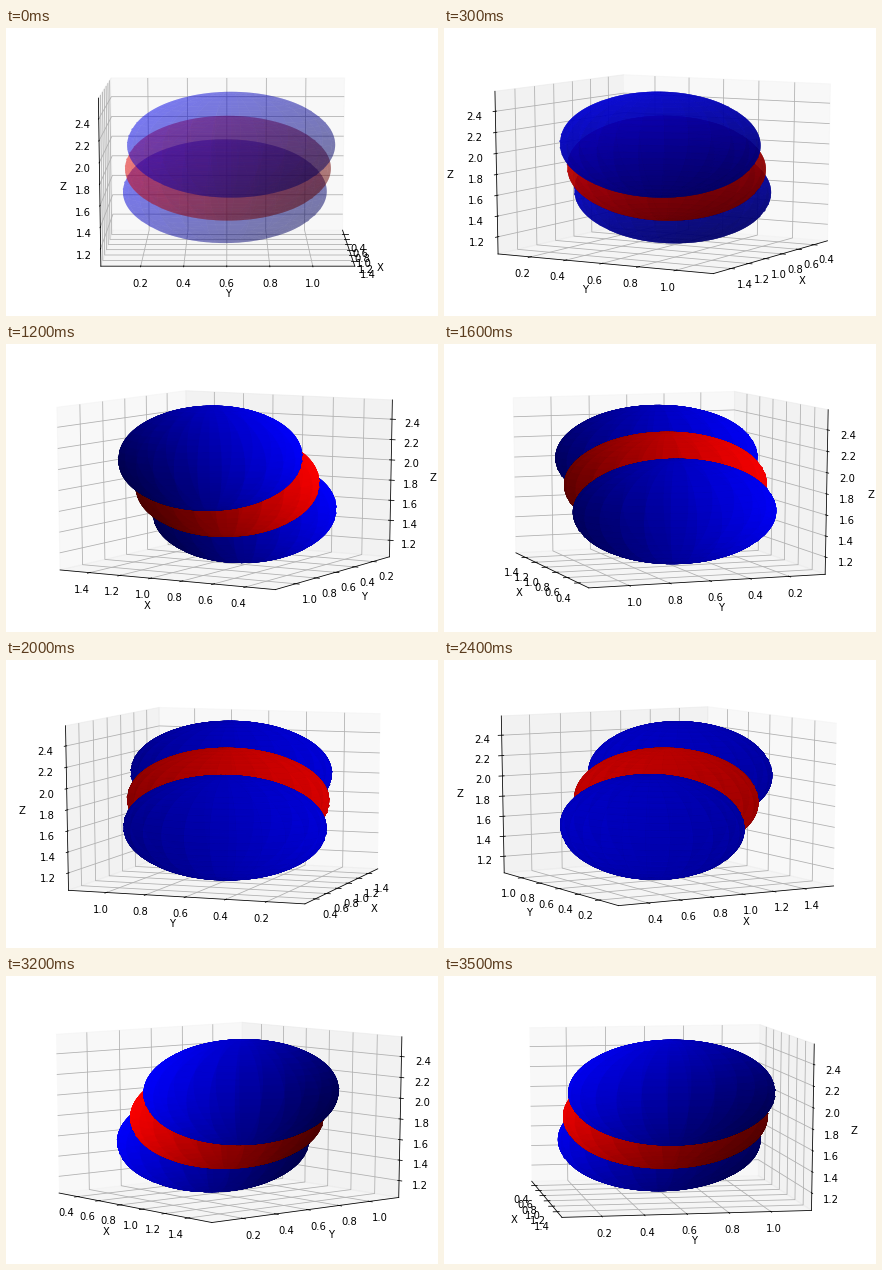
Write a matplotlib script that moves like this. It is 432x288 px and loops after 3600 ms.

```python
import numpy as np
import matplotlib.pyplot as plt
from matplotlib.animation import FuncAnimation

FRAMES = 36
ELEV = 10
ALPHA = 0.3
MAX_COATS = 16  # further coats hardly change the picture

RADIUS = 0.5
CENTER = np.array([0.909, 0.605, 1.811])
SHIFT = np.array([0.1015, 0.0152, 0.246])
MARGIN = np.array([0.05, 0.05, 0])

u = np.linspace(0, 2 * np.pi, 100)
v = np.linspace(0, np.pi, 100)
UNIT = np.array([
    np.outer(np.cos(u), np.sin(v)),
    np.outer(np.sin(u), np.sin(v)),
    np.outer(np.ones_like(u), np.cos(v)),
])

fig = plt.figure(figsize=(6, 4), dpi=72, facecolor="white")
ax = fig.add_axes([0, 0, 1, 1], projection="3d")
ax.apply_aspect = lambda position=None: None  # stretch to the whole figure


def add_sphere(center, color):
    """Plot a translucent sphere that can be painted in several coats."""
    x, y, z = center[:, None, None] + RADIUS * UNIT
    surf = ax.plot_surface(x, y, z, rstride=4, cstride=4, color=color,
                           linewidth=0, alpha=ALPHA)
    paint = surf.draw

    def draw(renderer):
        for _ in range(surf.coats):
            paint(renderer)

    surf.coats = 1
    surf.draw = draw
    return surf


spheres = [add_sphere(CENTER + k * SHIFT, color)
           for k, color in ((-1, "b"), (0, "r"), (1, "b"))]

# Unit cube with a small gap between the data limits and the panes
half = (RADIUS + SHIFT) * (1 + 2 * MARGIN) * 25 / 24
low, high = CENTER - half, CENTER + half
ax.set_xticks(np.arange(2, 8) * 0.2)
ax.set_yticks(np.arange(1, 6) * 0.2)
ax.set_zticks(np.arange(6, 13) * 0.2)
ax.set_xlim(low[0], high[0])
ax.set_ylim(low[1], high[1])
ax.set_zlim(low[2], high[2])
ax.set_box_aspect((1, 1, 1), zoom=np.sqrt(3) / 1.8294640721620434)
ax.set_xlabel("X")
ax.set_ylabel("Y")
ax.set_zlabel("Z")


def update(i):
    azim = 360 * i / FRAMES
    # tiny nudge keeps the back panes well defined in edge-on views
    azim -= 1e-3 * np.sin(np.radians(azim - 45))
    ax.view_init(elev=ELEV, azim=azim)
    for surf in spheres:
        surf.coats = min(i + 1, MAX_COATS)
    return spheres


anim = FuncAnimation(fig, update, frames=FRAMES, interval=100,
                     init_func=lambda: update(0), repeat=True,
                     repeat_delay=0, blit=False)
plt.show()
```
